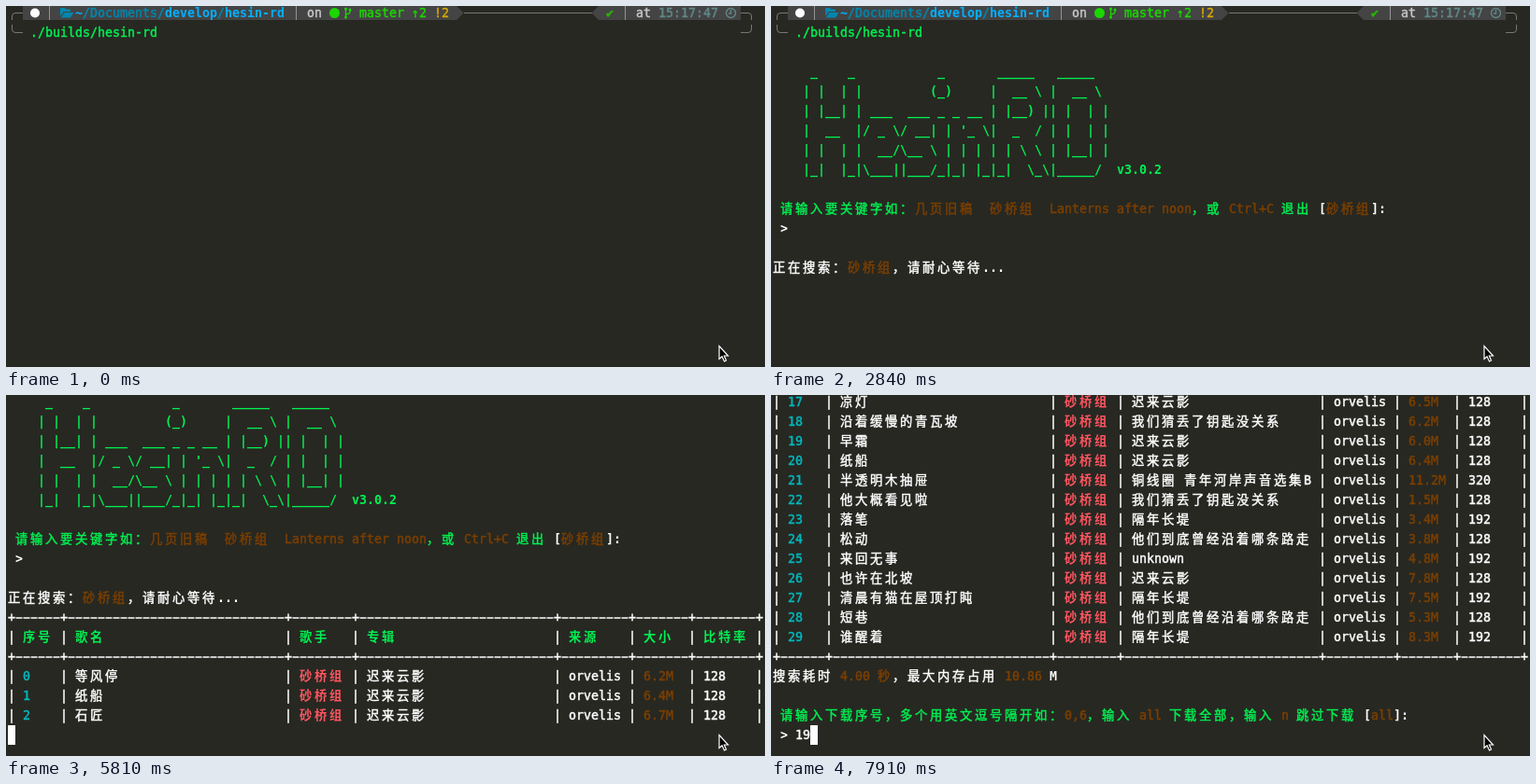
Write an HTML page with a canvas that moves like this. It is 812 px wide and 387 px high and loops after 8000 ms.

```html
<!DOCTYPE html>
<html lang="zh">
<head>
<meta charset="utf-8">
<style>
  html, body { margin: 0; width: 100%; height: 100%; overflow: hidden; background: #272822; }
  canvas { display: block; }
</style>
</head>
<body>
<canvas id="stage" width="812" height="387"></canvas>
<script>
const ctx = document.getElementById('stage').getContext('2d');
const LOOP = 8000, CELL = 8, ROW = 21, LEFT = 2;
const FONT = '13.3px "DejaVu Sans Mono", "Noto Sans CJK SC", "Noto Sans CJK", monospace';
const BACK = '#272822', WHITE = '#ffffff', GREEN = '#00f052', BROWN = '#7b3f00',
      RED = '#ff5560', CYAN = '#00b8bd', BAR = '#444444', FRAME = '#777777',
      BLUE = '#0087af', SKY = '#00afff', GIT = '#1cd600', GOLD = '#d7a800', TIME = '#5f8787';
const BAND = '砂桥组', SITE = 'orvelis', APP = 'hesin-rd';

const BANNER = String.raw`
 _    _           _       _____   _____
| |  | |         (_)     |  __ \ |  __ \
| |__| | ___  ___ _ _ __ | |__) || |  | |
|  __  |/ _ \/ __| | '_ \|  _  / | |  | |
| |  | |  __/\__ \ | | | | | \ \ | |__| |
|_|  |_|\___||___/_|_| |_|_|  \_\|_____/  v3.0.2`.split('\n').slice(1);

const STOPS = [0, 7, 37, 46, 73, 83, 91, 100];
const HEADS = ['序号', '歌名', '歌手', '专辑', '来源', '大小', '比特率'];
const ALBUM = { a: '迟来云影', b: '我们猜丢了钥匙没关系', c: '铜线圈 青年河岸声音选集B',
                d: '隔年长堤', e: '他们到底曾经沿着哪条路走', u: 'unknown' };
const parse = (first, text) => text.split(';').map((song, i) => {
  const [title, album, size, rate] = song.split(',');
  return [first + i, title, BAND, ALBUM[album], SITE, size + 'M', rate];
});
const FIRST_SONGS = parse(0, '等风停,a,6.2,128;纸船,a,6.4,128;石匠,a,6.7,128');
const LAST_SONGS = parse(17, '凉灯,a,6.5,128;沿着缓慢的青瓦坡,b,6.2,128;早霜,a,6.0,128;' +
  '纸船,a,6.4,128;半透明木抽屉,c,11.2,320;他大概看见啦,b,1.5,128;落笔,d,3.4,192;' +
  '松动,e,3.8,128;来回无事,u,4.8,192;也许在北坡,a,7.8,128;清晨有猫在屋顶打盹,d,7.5,192;' +
  '短巷,e,5.3,128;谁醒着,d,8.3,192');

const xOf = col => LEFT + col * CELL;

// Each part is [text, colour, bold]; wide characters take two cells.
// A hairline outline gives regular text a medium weight.
function print(row, col, ...parts) {
  ctx.lineWidth = 0.45;
  for (const [text, color, bold] of parts) {
    ctx.font = (bold ? 'bold ' : '') + FONT;
    ctx.fillStyle = ctx.strokeStyle = color;
    for (const ch of String(text)) {
      ctx.fillText(ch, xOf(col), 12 + row * ROW);
      if (!bold) ctx.strokeText(ch, xOf(col), 12 + row * ROW);
      col += ch.charCodeAt(0) > 0x2e80 ? 2 : 1;
    }
  }
}

function cursor(row, col) {
  ctx.fillStyle = WHITE;
  ctx.fillRect(xOf(col), row * ROW - 3, CELL, ROW);
}

function shape(path, fill, stroke, width = 1) {
  const p = new Path2D(path);
  if (fill) { ctx.fillStyle = fill; ctx.fill(p); }
  if (stroke) { ctx.strokeStyle = stroke; ctx.lineWidth = width; ctx.stroke(p); }
}

function dot(x, y, r, color) {
  ctx.fillStyle = color;
  ctx.beginPath();
  ctx.arc(x, y, r, 0, 7);
  ctx.fill();
}

function shellPrompt() {
  shape('M6.5 15V11Q6.5 7.5 10 7.5H18 M490 7.5H627 M786 7.5H794Q797.5 7.5 797.5 11V15' +
        'M6.5 20V25Q6.5 28.5 10 28.5H18 M786 28.5H794Q797.5 28.5 797.5 25V20', null, FRAME);
  shape('M18 0H482L489.5 7.5L482 15H18Z M786 0H634L626.5 7.5L634 15H786Z', BAR);
  shape('M46.5 0V15 M310.5 0V15 M662.5 0V15', null, '#949494');
  dot(31, 7.5, 5, WHITE);
  shape('M58 3Q58 2 59 2H63L64.5 3.5H68Q69 3.5 69 4.5V6H62L58 11Z M62.5 7H72.5L69 12.5H58.7Z', BLUE);
  dot(351.5, 7.5, 5.5, GIT);
  shape('M363.5 4V11 M368 5V6Q368 8.5 363.5 9', null, GIT, 1.3);
  for (const [x, y] of [[363.5, 3], [363.5, 12], [368, 4]]) dot(x, y, 1.5, GIT);
  shape('M780.5 7.5A5 5 0 1 1 770.5 7.5A5 5 0 1 1 780.5 7.5 M775.5 4V8H773', null, TIME, 1.4);
  print(0, 9, ['~', SKY, 1], ['/Documents/', BLUE], ['develop', SKY, 1], ['/', BLUE], [APP, SKY, 1]);
  print(0, 40, ['on', '#c6c6c6']);
  print(0, 47, ['master ⇡2 ', GIT], ['!2', GOLD]);
  print(0, 80, ['✔', '#2bb400']);
  print(0, 84, ['at ', '#c6c6c6'], ['15:17:47', TIME]);
  print(1, 3, ['./builds/' + APP, GREEN]);
}

function searchPrompt(top) {
  BANNER.forEach((text, i) => print(top + i, 4, [text, GREEN, 1]));
  print(top + 7, 1, ['请输入要关键字如：', GREEN], [`几页旧稿  ${BAND}  Lanterns after noon`, BROWN],
    ['，或 ', GREEN], ['Ctrl+C', BROWN], [' 退出 ', GREEN], ['[', WHITE, 1], [BAND, BROWN], [']:', WHITE, 1]);
  print(top + 8, 1, ['>', WHITE, 1]);
}

function searching(row) {
  print(row, 0, ['正在搜索：', WHITE], [BAND, BROWN], ['，请耐心等待', WHITE], ['...', WHITE, 1]);
}

function border(row) {
  STOPS.forEach(stop => print(row, stop, ['+', WHITE]));
  ctx.setLineDash([7, 1]);
  STOPS.slice(1).forEach((stop, i) =>
    shape(`M${xOf(STOPS[i] + 1) + 0.5} ${row * ROW + 8}H${xOf(stop)}`, null, WHITE, 1.5));
  ctx.setLineDash([]);
}

function tableRow(row, cells, colors, boldCells) {
  STOPS.forEach(stop => print(row, stop, ['|', WHITE]));
  cells.forEach((text, i) => print(row, STOPS[i] + 2, [text, colors[i], boldCells.includes(i)]));
}

function songRows(row, songs) {
  const colors = [CYAN, WHITE, RED, WHITE, WHITE, BROWN, WHITE];
  songs.forEach((song, i) => tableRow(row + i, song, colors, [2]));
}

function tableStart() {
  searchPrompt(0);
  searching(10);
  border(11);
  tableRow(12, HEADS, HEADS.map(() => GREEN), [0, 1, 2, 3, 4, 5, 6]);
  border(13);
  songRows(14, FIRST_SONGS);
  cursor(17, 0);
}

function tableEnd(typed, cursorOn) {
  songRows(0, LAST_SONGS);
  border(13);
  print(14, 0, ['搜索耗时 ', WHITE], ['4.00 秒', BROWN], ['，最大内存占用 ', WHITE],
    ['10.86', BROWN], [' M', WHITE, 1]);
  print(16, 1, ['请输入下载序号，多个用英文逗号隔开如：', GREEN], ['0,6', BROWN], ['，输入 ', GREEN],
    ['all', BROWN], [' 下载全部，输入 ', GREEN], ['n', BROWN], [' 跳过下载 ', GREEN],
    ['[', WHITE, 1], ['all', BROWN], [']:', WHITE, 1]);
  print(17, 1, ['> ', WHITE, 1], [typed, WHITE]);
  if (cursorOn) cursor(17, 3 + typed.length);
}

// The cursor starts visible and flips at every listed time.
const blink = (t, flips) => flips.filter(flip => t >= flip).length % 2 === 0;

function draw(now) {
  const t = now % LOOP;
  ctx.fillStyle = BACK;
  ctx.fillRect(0, 0, 812, 387);
  if (t < 5810) {
    shellPrompt();
    if (t >= 450) searchPrompt(3);
    if (t >= 450 && t < 1500) cursor(11, 3);
    if (t >= 1790) {
      searching(13);
      if (blink(t, [2840, 3430, 3880, 4320, 4920, 5370])) cursor(14, 0);
    }
  } else if (t < 5960) {
    tableStart();
  } else {
    tableEnd(t < 7310 ? '' : t < 7910 ? '1' : '19', blink(t, [6410, 6860]));
  }
  shape('M763 364.5V378.5L766 375.8L768.5 381L770.5 380L768.3 375H772.5Z', '#000', WHITE, 1.2);
  requestAnimationFrame(draw);
}
requestAnimationFrame(draw);
</script>
</body>
</html>
```
